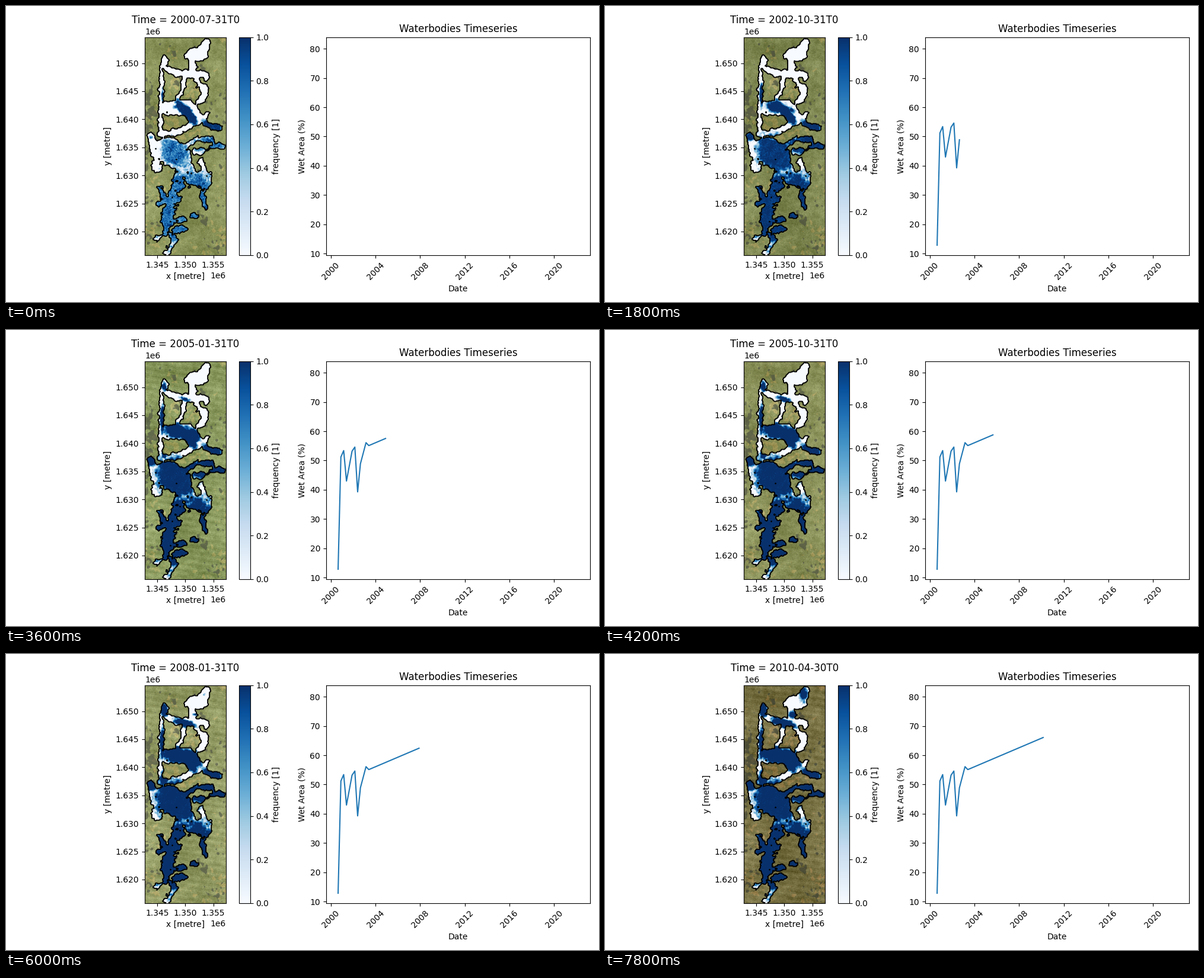
Recreate the animation shown at these times as a matplotlib script. Size 1000x500 px, loop 8000 ms.

```python
import numpy as np
import matplotlib.pyplot as plt
from matplotlib.animation import FuncAnimation
from matplotlib.cm import ScalarMappable

FRAMES, INTERVAL = 40, 200
LEFT, TOP, COLS, ROWS = 234, 53, 137, 368
WEST, EAST, SOUTH, NORTH = 1342800, 1357270, 1615780, 1654650
BLUES = plt.get_cmap("Blues")

X, Y = np.meshgrid(LEFT + 0.5 + np.arange(COLS), TOP + 0.5 + np.arange(ROWS))


def noise(sigma, seed):
    """Smooth random field with unit deviation."""
    raw = np.random.RandomState(seed).normal(size=(ROWS, COLS))
    fy, fx = np.fft.fftfreq(ROWS)[:, None], np.fft.fftfreq(COLS)
    blur = np.exp(-2 * (np.pi * sigma) ** 2 * (fx**2 + fy**2))
    field = np.fft.ifft2(np.fft.fft2(raw) * blur).real
    return (field - field.mean()) / field.std()


def channel(width, *points):
    """Positive inside a band of the given half width along a path."""
    reach = np.full_like(X, -np.inf)
    for (x0, y0), (x1, y1) in zip(points, points[1:]):
        dx, dy = x1 - x0, y1 - y0
        t = np.clip(((X - x0) * dx + (Y - y0) * dy) / (dx * dx + dy * dy), 0, 1)
        reach = np.maximum(reach, width - np.hypot(X - x0 - t * dx, Y - y0 - t * dy))
    return reach


def lake_mask():
    bands = [
        # northern arm and the ring below it
        channel(8, (337, 63), (331, 78)),
        channel(11, (313, 83), (327, 84)),
        channel(7, (313, 90), (315, 106)),
        channel(7, (267, 92), (266, 101)),
        channel(6, (270, 105), (287, 114), (304, 114), (337, 118)),
        channel(4, (300, 118), (298, 142), (289, 158)),
        channel(5, (322, 120), (326, 135), (338, 145), (325, 164)),
        channel(4, (262, 108), (261, 218)),
        # middle pool and its outlet
        channel(13, (272, 173), (308, 173), (320, 190)),
        channel(5, (320, 198), (338, 184), (335, 200), (358, 207)),
        channel(6, (262, 216), (290, 214), (312, 202)),
        # main body with the eastern fingers
        channel(22, (271, 243), (292, 256)),
        channel(7, (244, 222), (252, 248), (255, 272)),
        channel(3.5, (300, 238), (320, 226), (347, 226), (351, 235), (367, 237)),
        channel(4, (316, 247), (338, 244), (354, 237)),
        # southern lobe, leg and feet
        channel(12, (300, 270), (316, 291), (331, 292)),
        channel(4.5, (330, 262), (341, 290), (333, 318), (338, 340)),
        channel(9, (294, 280), (282, 325), (274, 350), (273, 368)),
        channel(3.5, (260, 308), (272, 330), (257, 333)),
        channel(3, (276, 364), (304, 361), (320, 354)),
        channel(5, (273, 365), (268, 385), (252, 394)),
        channel(4.5, (302, 377), (275, 380), (283, 396), (271, 415)),
    ]
    shore = np.max(bands, axis=0)
    rough = np.where(Y > 250, 1.5, 1.0)
    coast = shore + rough * (noise(1.6, 1) + noise(3.5, 2))
    specks = noise(1.1, 3) > np.where(Y > 262, 2.3, 2.9)
    return (coast > 0) & ~specks


def basin(x, y, rx, ry, tilt, start):
    """Distance field in radii, and the step at which the basin starts to fill."""
    a = np.radians(tilt)
    u = (X - x) * np.cos(a) + (Y - y) * np.sin(a)
    v = (Y - y) * np.cos(a) - (X - x) * np.sin(a)
    return np.hypot(u / rx, v / ry) + ragged, start


mask = lake_mask()
ragged = 0.07 * noise(1.2, 4) + 0.06 * noise(4, 5)
grain = 0.8 * noise(0.6, 6) + 0.6 * noise(3, 7)
southern = Y > 212

ALWAYS = -60
basins = [
    basin(304, 181, 23, 7.5, 52, ALWAYS),
    basin(345, 203, 15, 8, 25, ALWAYS),
    basin(304, 345, 60, 60, 0, ALWAYS),
    basin(285, 250, 37, 29, 45, -12),
    basin(340, 235, 38, 18, 0, -12),
    basin(264, 152, 4, 26, 0, -6),
    basin(245, 222, 12, 10, 0, -3),
    basin(288, 172, 27, 14, 10, -2),
    basin(314, 178, 18, 12, 40, 4),
    basin(267, 97, 7, 11, 0, 8),
    basin(267, 212, 8, 16, 0, 10),
    basin(302, 118, 22, 7, 20, 13),
    basin(318, 103, 14, 8, 0, 26),
    basin(333, 70, 10, 20, 0, 28),
]


def frequency(n):
    freq = np.zeros_like(X)
    for dist, start in basins:
        size = 1.35 * (1 - np.exp(-max(n - start, 0) / 10))
        freq = np.maximum(freq, np.clip((size - dist) / 0.4, 0, 1) * (size > 0))
    freq *= np.where(southern, 1 - 0.27 * np.exp(-n / 4.5), 1)
    spread = (0.09 * np.exp(-n / 6) + 0.015) * np.where(southern, 1, 0.4)
    return np.clip(freq + spread * grain * (freq > 0.1), 0, 1)


# Land colour in July, October, January and April: first and last year
SEASONS = np.array([
    [(138, 148, 90), (146, 148, 92)],
    [(117, 127, 74), (153, 157, 99)],
    [(122, 150, 84), (152, 154, 102)],
    [(104, 114, 67), (117, 111, 66)],
], float)
texture = 5 * noise(0.5, 8) + 5 * noise(2.5, 9) + 7 * noise(14, 10)
tan = np.clip(noise(1.6, 11) + 0.8 * noise(12, 12) - 1.3, 0, 1)
edge = 1.8 * np.exp(-(X - LEFT) / 12)
scrub = np.clip(noise(1.8, 13) + 0.9 * noise(8, 14) + edge - 2.1, 0, 0.65)


def land(n):
    first, last = SEASONS[n % 4]
    base = first + (last - first) * n / (FRAMES - 1)
    rgb = base + texture[..., None] + tan[..., None] * np.array([30, 14, 8])
    if n >= 12:  # scan line gaps
        wave = np.sin(2 * np.pi * (Y - 0.15 * X + 3 * n) / 11) ** 3
        rgb = rgb + (3 if n % 4 == 1 else 8) * wave[..., None]
    dark = np.array([76, 80, 66]) * base.mean() / 122
    s = scrub[..., None]
    return np.clip((rgb * (1 - s) + dark * s) / 255, 0, 1)


def scene(n):
    return np.where(mask[..., None], BLUES(frequency(n))[..., :3], land(n))


def date_title(n):
    year, month = divmod(6 + 3 * n, 12)
    return f"Time = {2000 + year}-{month + 1:02d}-{30 if month == 3 else 31}T0"


def wet_area(steps):
    """Early ups and downs, then one steady rise."""
    knots = [1, 2, 3, 4, 6, 7, 8, 9, 11, 12, 39]
    levels = [12.9, 51.2, 53.4, 43.0, 53.2, 54.6, 39.3, 48.9, 56.1, 55.1, 66.05]
    return np.interp(steps, knots, levels)


fig, (map_ax, chart) = plt.subplots(1, 2, figsize=(10, 5), dpi=100)

image = map_ax.imshow(scene(0), extent=(WEST, EAST, SOUTH, NORTH), interpolation="nearest")
ground_x = WEST + (X - LEFT) * (EAST - WEST) / COLS
ground_y = NORTH - (Y - TOP) * (NORTH - SOUTH) / ROWS
map_ax.contour(ground_x, ground_y, mask.astype(float), levels=[0.5],
               colors="black", linewidths=1.35)
map_ax.set(xlim=(WEST, EAST), ylim=(SOUTH, NORTH), xlabel="x [metre]", ylabel="y [metre]")
map_ax.set_xticks(range(1345000, 1355001, 5000))
map_ax.set_yticks(range(1620000, 1650001, 5000))
title = map_ax.set_title(date_title(0))
fig.colorbar(ScalarMappable(plt.Normalize(0, 1), BLUES), ax=map_ax, label="frequency [1]")

FIRST, YEARS = 2000.65, 21.5
margin = 0.05 * YEARS
line, = chart.plot([], [])
chart.set(xlim=(FIRST - margin, FIRST + YEARS + margin), ylim=(9.5, 83.95),
          title="Waterbodies Timeseries", xlabel="Date", ylabel="Wet Area (%)")
chart.set_xticks(range(2000, 2021, 4))
chart.set_yticks(range(10, 81, 10))
chart.tick_params(axis="x", rotation=45)
fig.tight_layout()


def draw(n):
    image.set_data(scene(n))
    title.set_text(date_title(n))
    steps = np.arange(1, n + 1)
    line.set_data(FIRST + 0.25 * (steps - 1), wet_area(steps))
    return image, title, line


anim = FuncAnimation(fig, draw, frames=FRAMES, interval=INTERVAL,
                     repeat=True, repeat_delay=0, blit=False)
plt.show()
```
